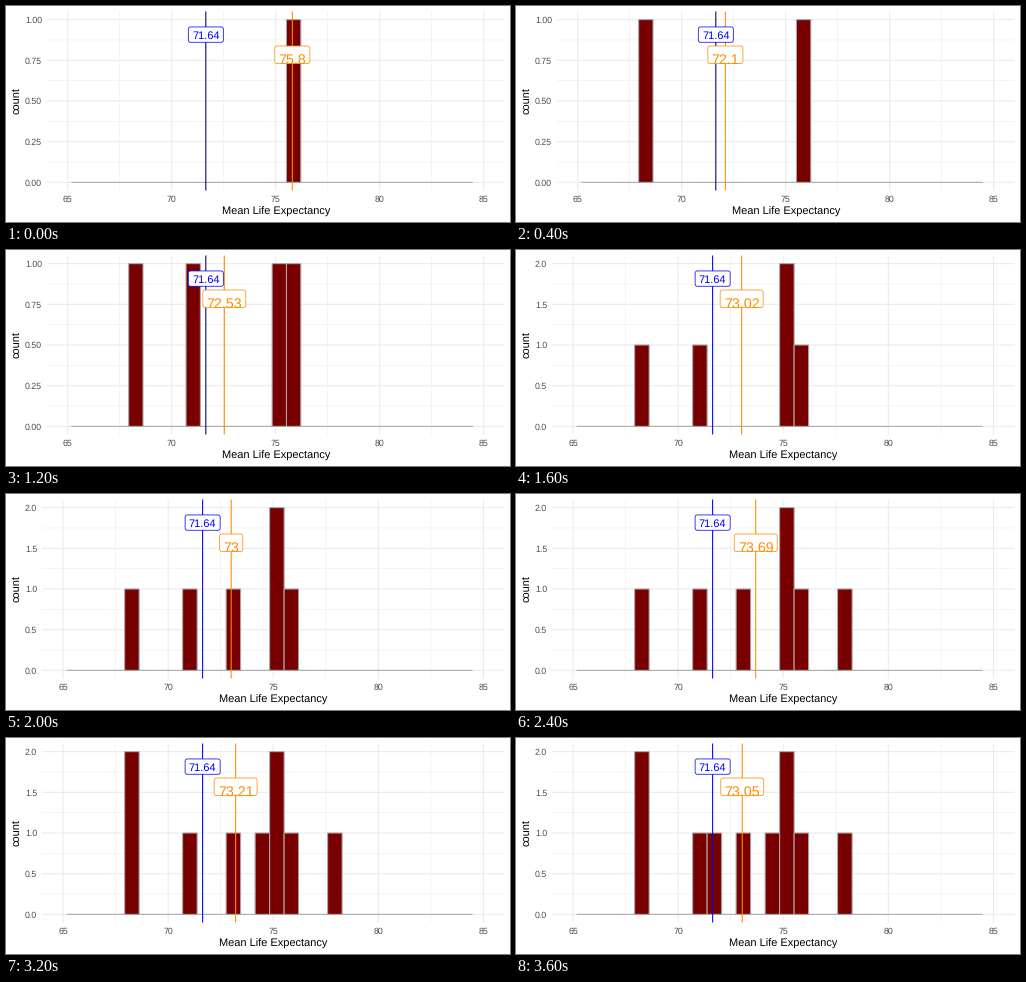
Animation of 504 by 216 pixels, one loop 4000 ms. Source, as a matplotlib script:

```python
import numpy as np
import matplotlib.pyplot as plt
from matplotlib.animation import FuncAnimation
from matplotlib.patches import FancyBboxPatch, Rectangle

plt.rcParams.update({"font.family": "Liberation Sans", "text.hinting": "none"})

W, H = 504, 216
TOP, BOTTOM, RIGHT = 5.5, 184.5, 498.5
Y0, Y1 = 176.36, 13.64          # zero and the tallest bar
LINE = 1.07
POP_MEAN = 71.64
ORANGE = "#ff8c00"

SAMPLE = [75.8, 68.4, 75.0, 70.9, 75.0, 72.9, 77.8, 68.6, 74.5, 71.6]
BIN = 20 / 29
EDGES = (np.arange(94, 123) + 0.5) * BIN

fig = plt.figure(figsize=(W / 72, H / 72), dpi=72, facecolor="white")
ax = fig.add_axes([0, 0, 1, 1])


def line(xs, ys, color, lw, z):
    ax.plot(xs, ys, color=color, lw=lw, zorder=z, snap=False,
            solid_capstyle="butt")


def text(x, y, s, size, color="black", **kw):
    kw = {"ha": "center", "va": "baseline", **kw}
    ax.text(x, y, s, fontsize=size, color=color, zorder=9, **kw)


def tag(x, mid, baseline, s, size, color):
    """White rounded label centred on x."""
    em = 0.556 * sum(c != "." for c in s) + 0.278 * s.count(".")
    w, h = em * size + 7.4, 0.716 * size + 7.4
    ax.add_patch(FancyBboxPatch(
        (x - w / 2, mid - h / 2), w, h, boxstyle="round,pad=0,rounding_size=2.2",
        fc="white", ec=color, lw=0.75, zorder=8, snap=False))
    text(x, baseline, s, size, color)


def draw(i):
    ax.clear()
    ax.set(xlim=(0, W), ylim=(H, 0))
    ax.axis("off")

    seen = SAMPLE[:i + 1]
    counts, _ = np.histogram(seen, EDGES)
    peak = counts.max()
    left, digits = (40.9, 2) if peak == 1 else (36.0, 1)

    def px(v):
        return left + (v - 64) * (RIGHT - left) / 22

    def py(c):
        return Y0 + (Y1 - Y0) * c / peak

    # grid and axis text
    for k in range(9):
        major = k % 2 == 0
        lw, z = (LINE, 2) if major else (LINE / 2, 1)
        x, y = px(65 + 2.5 * k), py(peak * k / 8)
        line([x, x], [TOP, BOTTOM], "#ebebeb", lw, z)
        line([left, RIGHT], [y, y], "#ebebeb", lw, z)
        if major:
            text(x, 195.8, f"{65 + 2.5 * k:.0f}", 8.8, "#4d4d4d")
            text(left - 4.95, y + 3.2, f"{peak * k / 8:.{digits}f}", 8.8,
                 "#4d4d4d", ha="right")
    text((left + RIGHT) / 2, 208.9, "Mean Life Expectancy", 11)
    text(13.4, (TOP + BOTTOM) / 2, "count", 11, rotation=90,
         rotation_mode="anchor")

    # histogram
    line(px(EDGES[[0, -1]]), [Y0, Y0], "#a9a9a9", LINE, 3)
    for a, b, c in zip(px(EDGES), px(EDGES[1:]), counts):
        if c:
            ax.add_patch(Rectangle((a, py(c)), b - a, Y0 - py(c), fc="#780000",
                                   ec="#a9a9a9", lw=LINE, zorder=4, snap=False))

    # means
    mean = round(sum(seen) / len(seen) + 1e-9, 2)
    xp, xm = px(POP_MEAN), px(mean)
    line([xp, xp], [TOP, BOTTOM], "#000060" if peak == 1 else "blue", LINE, 5)
    line([xm, xm], [TOP, BOTTOM], ORANGE, LINE, 6)
    tag(xp, 28.6, 33.2, f"{POP_MEAN}", 11.04, "blue")
    tag(xm, 48.8, 57.6, f"{mean:g}", 14.2, ORANGE)
    return []


anim = FuncAnimation(fig, draw, frames=len(SAMPLE), interval=400,
                     init_func=lambda: [], repeat=True, repeat_delay=0)
plt.show()
```
